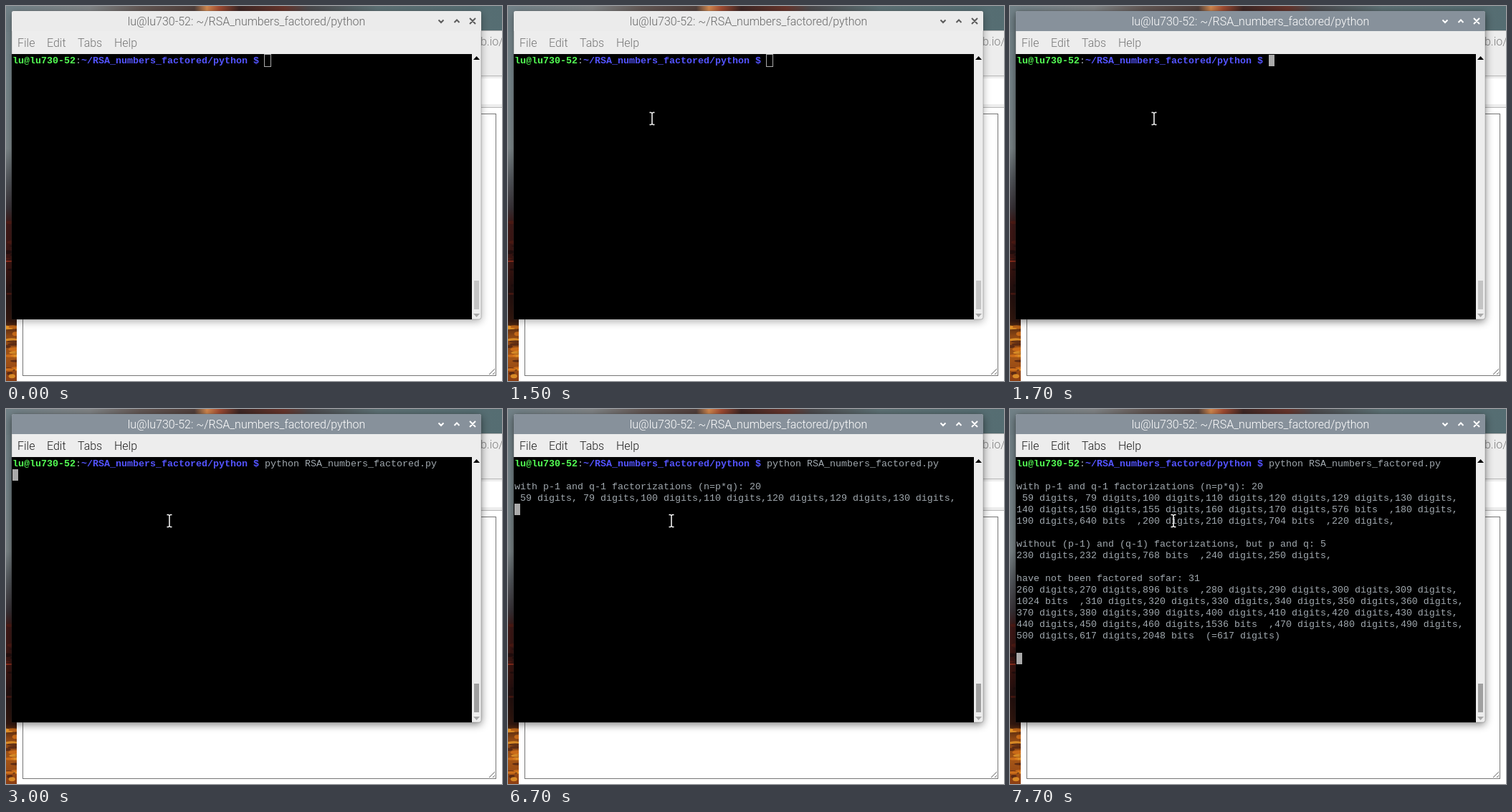
Recreate the animation shown at these times as an HTML page. Size 692x523 px, loop 8 s.

```html
<!DOCTYPE html>
<html lang="en">
<head>
<meta charset="utf-8">
<title>Terminal session</title>
<style>
  html, body { margin: 0; width: 100%; height: 100%; overflow: hidden; background: #fff; }
  svg { display: block; width: 100%; height: 100%; }
  text { white-space: pre; }
  .ui { font: 300 16px Roboto, sans-serif; }
  .mono { font: 13.333px "Liberation Mono", monospace; fill: #a0a8ae; }
  .bold { font-weight: 700; }
</style>
</head>
<body>
<svg viewBox="0 0 692 523">
  <defs>
    <linearGradient id="sky" x2="0" y2="1">
      <stop offset="0" stop-color="#718187"/>
      <stop offset=".2" stop-color="#77868b"/>
      <stop offset=".38" stop-color="#7b8588"/>
      <stop offset=".46" stop-color="#55595e"/>
      <stop offset=".54" stop-color="#393338"/>
      <stop offset=".58" stop-color="#401a18"/>
      <stop offset=".7" stop-color="#3a1511"/>
      <stop offset=".76" stop-color="#22100f"/>
      <stop offset=".84" stop-color="#33180f"/>
      <stop offset=".88" stop-color="#8e4713"/>
      <stop offset=".94" stop-color="#a35416"/>
      <stop offset="1" stop-color="#8c3f14"/>
    </linearGradient>
    <linearGradient id="clouds">
      <stop offset="0" stop-color="#718187"/>
      <stop offset=".17" stop-color="#808486"/>
      <stop offset=".27" stop-color="#635855"/>
      <stop offset=".38" stop-color="#51403c"/>
      <stop offset=".405" stop-color="#d3894f"/>
      <stop offset=".43" stop-color="#a24c32"/>
      <stop offset=".47" stop-color="#3d2725"/>
      <stop offset=".56" stop-color="#67352c"/>
      <stop offset=".61" stop-color="#4b4a4d"/>
      <stop offset=".75" stop-color="#5d7175"/>
      <stop offset="1" stop-color="#556d72"/>
    </linearGradient>
    <filter id="blur" x="-10%" y="-10%" width="120%" height="125%">
      <feGaussianBlur stdDeviation="6"/>
    </filter>
    <clipPath id="strip"><path d="M0 0H15V523H0z"/></clipPath>
  </defs>

  <rect width="692" height="523" fill="url(#sky)"/>
  <rect width="692" height="36" fill="url(#clouds)"/>
  <g id="streaks" clip-path="url(#strip)"></g>

  <g id="browser">
    <path d="M15 35H692V523H15z" fill="#fff"/>
    <path d="M15 35H692V97H15z" fill="#ededed"/>
    <path d="M15 98H692V101H15zM15 137H692V141H15z" fill="#ededed"/>
    <path d="M15 34.5H692M15 97.5H692M15 141.5H692" stroke="#b8b8b8"/>
    <text class="ui" x="662" y="55" fill="#808080">b.io/</text>
    <rect x="23.5" y="150.5" width="660" height="365" fill="#fff" stroke="#767676"/>
    <path d="M674 514l8 -8M679 514l3 -3" stroke="#666" fill="none"/>
  </g>

  <rect id="shadow" x="8" y="10" width="655" height="430" rx="4" filter="url(#blur)"/>
  <path d="M8 437V10q0 -3 3 -3H660q3 0 3 3V434q0 3 -3 3z" fill="#ededed" stroke="#444" stroke-opacity=".3"/>
  <path id="bar" d="M8 35V10q0 -3 3 -3H660q3 0 3 3V35z"/>
  <text id="title" class="ui" x="335.5" y="27" text-anchor="middle">lu@lu730-52: ~/RSA_numbers_factored/python</text>
  <path id="buttons" d="M603.5 19.5l3.5 3.5l3.5 -3.5M625.5 23l3.5 -3.5l3.5 3.5M647 17l8 8M655 17l-8 8" fill="none" stroke-width="2"/>
  <g id="menu" class="ui">
    <text x="16" y="57">File</text>
    <text x="57" y="57">Edit</text>
    <text x="100" y="57">Tabs</text>
    <text x="151" y="57">Help</text>
  </g>

  <path d="M8 67H650V437H8z"/>
  <path d="M652 75l4.5 -5l4.5 5z"/>
  <path d="M652 429l4.5 5l4.5 -5z" fill="#a9a9a9"/>
  <rect id="thumb" x="653" y="383" width="7" height="40"/>

  <text class="mono" x="9" y="80"><tspan class="bold" fill="#54ff54">lu@lu730-52</tspan>:<tspan class="bold" fill="#5454ff">~/RSA_numbers_factored/python $</tspan></text>
  <g id="output" class="mono"></g>
  <rect id="caret"/>
  <g id="pointer">
    <path id="beam" d="M-3.5 -8.5H-1.5L0 -7.5L1.5 -8.5H3.5M0 -7.5V7.5M-3.5 8.5H-1.5L0 7.5L1.5 8.5H3.5" fill="none" stroke="#fff" stroke-width="1.5"/>
    <path id="arrow" d="M0 0V15L3.6 11.6L6 17L8.4 16L6 10.7H11z" fill="#000" stroke="#fff"/>
  </g>
</svg>
<script>
const LOOP = 8000, STEP = 100, CELL = 8, ROW = 16, LEFT = 9, TOP = 68;
const $ = id => document.getElementById(id);

function add(parent, tag, attrs, content = "") {
  const el = document.createElementNS("http://www.w3.org/2000/svg", tag);
  set(el, attrs);
  el.textContent = content;
  return parent.appendChild(el);
}

function set(el, attrs) {
  for (const k in attrs) el.setAttribute(k, attrs[k]);
}

const show = (el, on) => el.setAttribute("visibility", on ? "visible" : "hidden");
const clamp = v => Math.min(1, Math.max(0, v));
const mix = (a, b, k) => a + (b - a) * k;
const smooth = k => k * k * (3 - 2 * k);
const grey = v => `rgb(${[v, v, v].map(Math.round)})`;

// Each block: time of appearance, first row, lines
const blocks = [
  [6700, 2, [
    "with p-1 and q-1 factorizations (n=p*q): 20",
    " 59 digits, 79 digits,100 digits,110 digits,120 digits,129 digits,130 digits,"]],
  [7100, 4, ["140 digits,150 digits,155 digits,160 digits,170 digits,576 bits  ,180 digits,"]],
  [7700, 5, [
    "190 digits,640 bits  ,200 digits,210 digits,704 bits  ,220 digits,",
    "",
    "without (p-1) and (q-1) factorizations, but p and q: 5",
    "230 digits,232 digits,768 bits  ,240 digits,250 digits,",
    "",
    "have not been factored sofar: 31",
    "260 digits,270 digits,896 bits  ,280 digits,290 digits,300 digits,309 digits,",
    "1024 bits  ,310 digits,320 digits,330 digits,340 digits,350 digits,360 digits,",
    "370 digits,380 digits,390 digits,400 digits,410 digits,420 digits,430 digits,",
    "440 digits,450 digits,460 digits,1536 bits  ,470 digits,480 digits,490 digits,",
    "500 digits,617 digits,2048 bits  (=617 digits)"]]
];

// Caret cell over time: [start, column, row]
const caretStops = [[0, 44, 0], [2900, 75, 0], [3000, 0, 1], [6700, 0, 4], [7100, 0, 5], [7700, 0, 17]];

const groups = [];
function addLines(start, row, lines, col = 0) {
  const g = add($("output"), "g", {});
  lines.forEach((line, i) =>
    add(g, "text", { x: LEFT + col * CELL, y: TOP + 12 + (row + i) * ROW }, line));
  groups.push({ start, g });
}
addLines(2900, 0, ["python RSA_numbers_factored.py"], 44);
blocks.forEach(b => addLines(...b));

let seed = 11;
const rnd = () => (seed = seed * 16807 % 2147483647) / 2147483647;
for (let i = 0; i < 34; i++) {
  const low = i > 9;
  add($("streaks"), "ellipse", {
    cx: rnd() * 15,
    cy: low ? 446 + rnd() * 76 : 290 + rnd() * 140,
    rx: 4 + rnd() * 6,
    ry: 1 + rnd() * 2,
    fill: low ? ["#f0a02c", "#d9761b", "#4a2013"][i % 3] : ["#5a1d16", "#1c0e0e"][i % 2],
    opacity: .75
  });
}
add($("streaks"), "rect", { y: 355, width: 8, height: 2, fill: "#8a2c1c" });

function pointerAt(t) {
  if (t < 1700) {
    const k = 1 - (1 - clamp((t - 1000) / 500)) ** 2;
    return [mix(103, 201, k), mix(21, 157, k)];
  }
  const k = smooth(clamp((t - 1700) / 600));
  return [mix(201, 228, k), mix(157, 156, k)];
}

function draw(ms) {
  const t = Math.floor(ms / STEP) * STEP;
  const active = t >= 1700;
  const focus = clamp((t - 1700) / 200);

  set($("bar"), { fill: active ? "#87919b" : "#ebebeb" });
  set($("title"), { fill: active ? "#fff" : "#686868" });
  set($("buttons"), { stroke: active ? "#fff" : "#5c5c5c" });
  set($("shadow"), { opacity: active ? .5 : .32 });
  set($("menu"), { fill: grey(mix(118, 32, focus)) });
  set($("thumb"), { fill: grey(mix(196, 160, focus)) });

  groups.forEach(({ start, g }) => show(g, t >= start));

  const [, col, row] = caretStops.filter(s => t >= s[0]).pop();
  const x = LEFT + col * CELL, y = TOP + row * ROW;
  set($("caret"), active
    ? { x, y, width: 8, height: 16, fill: "#aaa", stroke: "none" }
    : { x: x - .5, y: y - .5, width: 9, height: 17, fill: "none", stroke: "#aaa" });

  const [px, py] = pointerAt(t);
  const inside = py >= 67;
  set($("pointer"), { transform: `translate(${px} ${py})` });
  show($("beam"), t >= 1000 && inside);
  show($("arrow"), t >= 1000 && !inside);
}

const begin = performance.now();
function tick() {
  draw((performance.now() - begin) % LOOP);
  requestAnimationFrame(tick);
}
draw(0);
requestAnimationFrame(tick);
</script>
</body>
</html>
```
